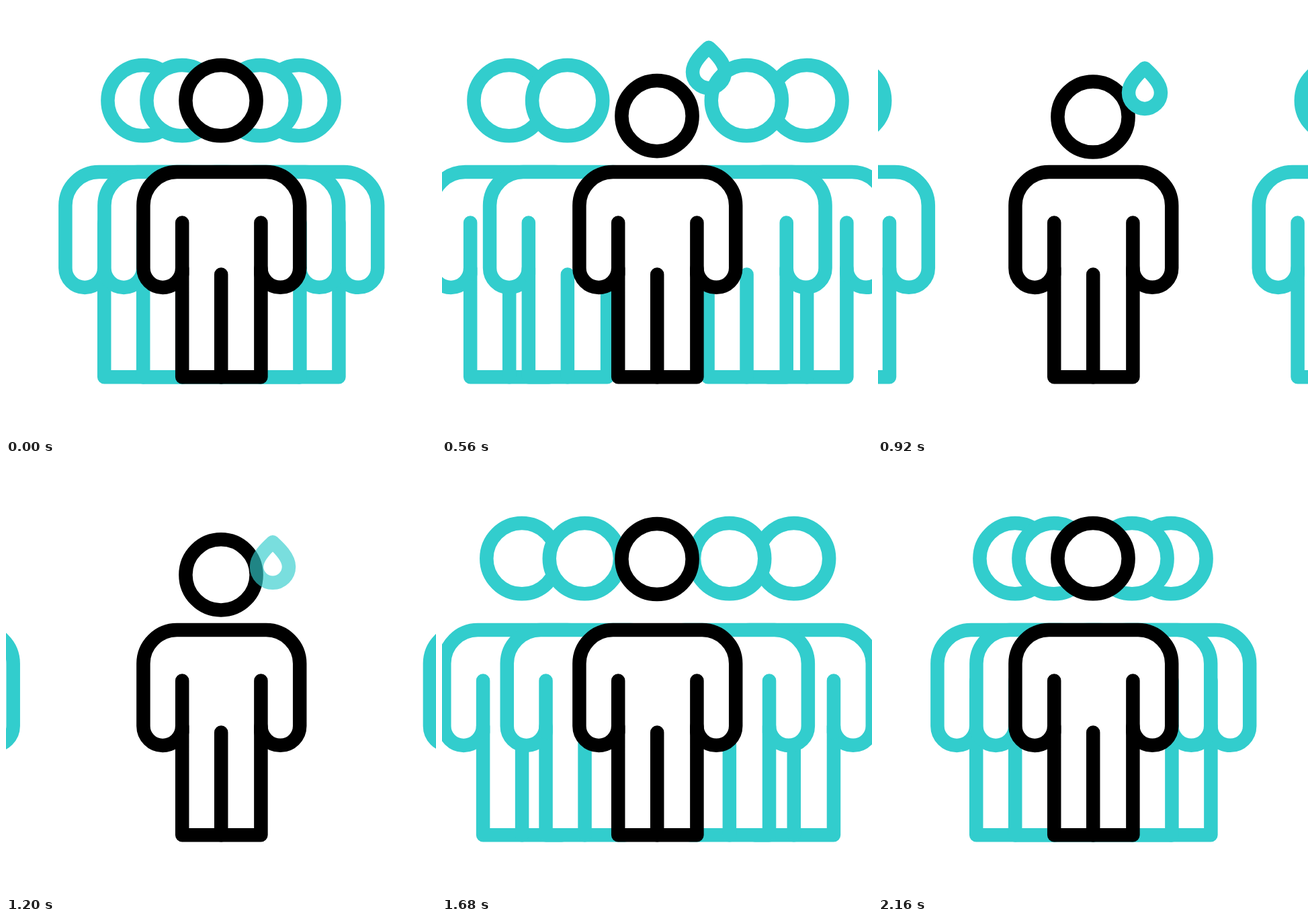
These frames come from a looping animation (640x640 px, 2200 ms). An HTML page:

```html
<!DOCTYPE html>
<html lang="en">
<head>
<meta charset="utf-8">
<title>Person stepping out of a crowd</title>
<style>
  html, body { margin: 0; width: 100%; height: 100%; overflow: hidden; background: #fff; }
  svg { display: block; width: 100%; height: 100%; }
  .line { stroke-width: 20.5; stroke-linecap: round; stroke-linejoin: round; }
  .crowd { stroke: #32cdcd; }
  .hero { stroke: #000; }
</style>
</head>
<body>
<svg viewBox="0 0 640 640">
  <defs>
    <circle id="head" cx="320" cy="140.7" r="52.6" fill="#fff"/>
    <g id="body">
      <path fill="#fff" d="M262.2 552.2V390a28.9 28.9 0 0 1-57.8 0V297a50 50 0 0 1 50-50H387.2a50 50 0 0 1 50 50V390a28.9 28.9 0 0 1-57.8 0V552.2Z"/>
      <path fill="none" d="M262.2 322.5V400M379.4 322.5V400M320.2 399.5V552.2"/>
    </g>
    <g id="person"><use href="#body"/><use href="#head"/></g>
  </defs>
  <g class="line crowd" id="crowd"></g>
  <g class="line hero">
    <use href="#body"/>
    <use href="#head" id="heroHead"/>
  </g>
  <path class="line crowd" id="drop" fill="none" d="M397 10.3C390 16.8 373 31.8 373 46.8a24 24 0 0 0 48 0C421 31.8 404 16.8 397 10.3Z"/>
</svg>
<script>
const LOOP = 2200, STEP = 40, POWER = 1.962;

// side, resting distance, leave time and pace, arrival time and pace (seconds)
const walkers = [
  { side: -1, rest: 116, leave: 0.108, out: 494, arrive: 2.055, back: 583 },
  { side: 1, rest: 116, leave: 0.108, out: 508, arrive: 2.055, back: 600 },
  { side: -1, rest: 58, leave: 0.213, out: 601, arrive: 1.95, back: 648 },
  { side: 1, rest: 58, leave: 0.213, out: 601, arrive: 1.95, back: 648 }
];

const byId = id => document.getElementById(id);
const clamp = v => Math.min(1, Math.max(0, v));
const ramp = (t, from, to) => clamp((t - from) / (to - from));
const smooth = p => p * p * (3 - 2 * p);
const accel = (pace, time) => pace * Math.max(0, time) ** POWER;

for (const w of walkers) {
  w.el = document.createElementNS('http://www.w3.org/2000/svg', 'use');
  w.el.setAttribute('href', '#person');
  byId('crowd').append(w.el);
}

function move(el, x, y) {
  el.setAttribute('transform', `translate(${x.toFixed(2)} ${y.toFixed(2)})`);
}

function draw(ms) {
  const s = ms / 1000;
  for (const w of walkers) {
    const walked = Math.min(accel(w.out, s - w.leave), accel(w.back, w.arrive - s));
    move(w.el, w.side * (w.rest + walked), 0);
  }

  const bow = smooth(ramp(ms, 80, 640)) - smooth(ramp(ms, 1180, 1740));
  move(byId('heroHead'), 0, 24.3 * bow);

  move(byId('drop'), 0, 65 + (ms - 720) * 0.0854);
  byId('drop').setAttribute('opacity', ramp(ms, 380, 540) * (1 - ramp(ms, 1144, 1304)));
}

const start = performance.now();
function tick() {
  const t = (performance.now() - start) % LOOP;
  draw(Math.floor(t / STEP) * STEP);
  requestAnimationFrame(tick);
}
tick();
</script>
</body>
</html>
```
